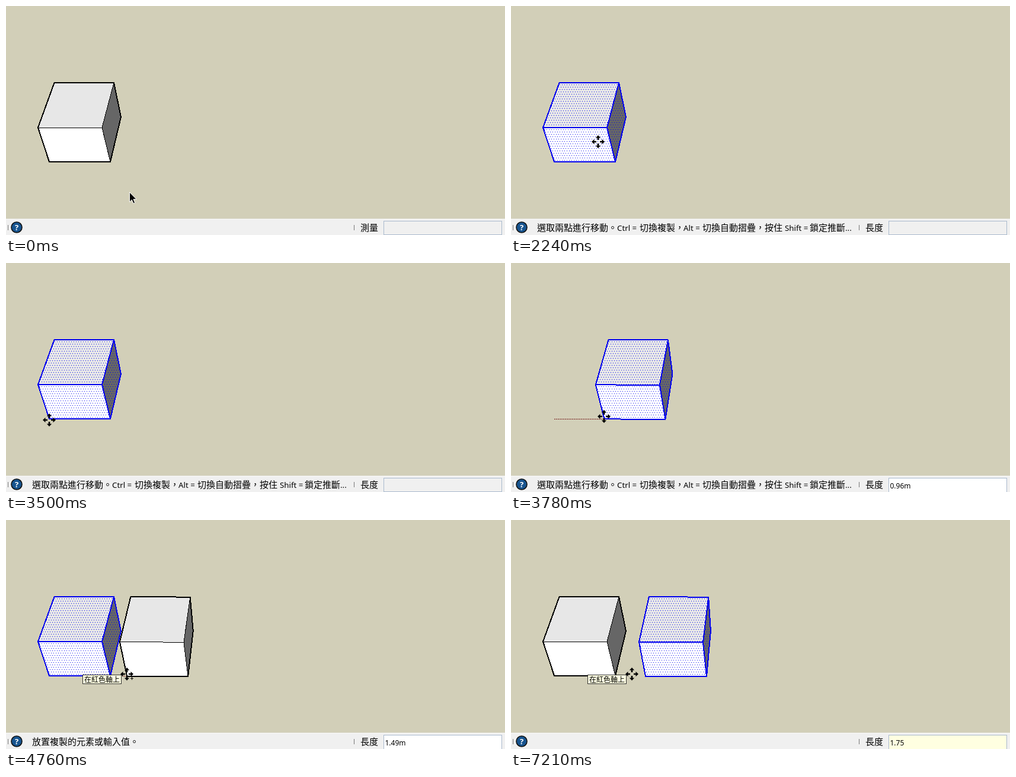
Animation of 842 by 388 pixels, one loop 8000 ms. Source, as an HTML page:

```html
<!DOCTYPE html>
<html lang="zh-TW">
<head>
<meta charset="utf-8">
<title>移動與複製</title>
<style>
  html, body { margin: 0; width: 100%; height: 100%; overflow: hidden; background: #d2cfb8; }
  svg { display: block; }
  text { font: 15px "Noto Sans CJK TC", "Noto Sans CJK", sans-serif; white-space: pre; }
  .latin { font: 13.3px "Noto Sans", "Open Sans", sans-serif; }
  .value { font: 12px "Noto Sans", "Open Sans", sans-serif; }
  .crisp { shape-rendering: crispEdges; }
</style>
</head>
<body>
<svg width="842" height="388" viewBox="0 0 842 388">
  <defs>
    <pattern id="dots" y="1" width="4" height="8" patternUnits="userSpaceOnUse">
      <path class="crisp" fill="#0000ee" d="M0 0h1v1h-1zM2 4h1v1h-1z"/>
    </pattern>
    <path id="arm" d="M0 -11L4.2 -6.5H1.3V-3H-1.3V-6.5H-4.2Z"/>
  </defs>
  <rect width="842" height="388" fill="#d2cfb8"/>
  <path id="guide" class="crisp" stroke="#701414" stroke-dasharray="2 1"/>
  <g id="scene" class="crisp"></g>

  <g id="bar">
    <rect y="360" width="842" height="28" fill="#f0f0f0"/>
    <path class="crisp" d="M0 360.5H842" stroke="#e2e1d8"/>
    <path class="crisp" d="M0 361.5H842" stroke="#fafafa"/>
    <path class="crisp" d="M3.5 371V380M587.5 371V380" stroke="#777"/>
    <circle cx="18" cy="375" r="9" fill="#17548f" stroke="#111" stroke-width="1.6"/>
    <text x="18" y="380" text-anchor="middle" fill="#fff" style="font:bold 13px 'Open Sans',sans-serif">?</text>
    <text class="status" x="44" y="381">選取物件。切換到擴充選取。拖曳滑鼠以選取多項。</text>
    <text class="status" y="381"><tspan x="44">選取兩點進行移動。</tspan><tspan class="latin" x="179">Ctrl =</tspan><tspan x="217">切換複製，</tspan><tspan class="latin" x="291">Alt =</tspan><tspan x="323">切換自動摺疊，</tspan><tspan x="428">按住</tspan><tspan class="latin" x="462">Shift =</tspan><tspan x="504">鎖定推斷</tspan><tspan class="latin" x="564">...</tspan></text>
    <text class="status" x="44" y="381">放置複製的元素或輸入值。</text>
    <text id="label" x="598" y="381"></text>
    <rect id="field" class="crisp" x="637.5" y="364.5" width="199" stroke="#a9b9cd"/>
    <text id="value" class="value" x="639.5" y="382"></text>
  </g>

  <g id="tip">
    <rect class="crisp" x="129.5" y="262.5" width="65" height="15" fill="#ffffe1" stroke="#333"/>
    <text x="132" y="275" style="font-size:12px">在紅色軸上</text>
  </g>
  <circle id="snap" cx="73" cy="263" r="4" fill="#1fa32a" stroke="#145c1a"/>
  <path id="arrow" d="M.5 .5V17L4.3 13.4L7 19.6L9.7 18.4L7 12.4H12Z" fill="#000" stroke="#fff"/>
  <g id="mover">
    <use href="#arm"/>
    <use href="#arm" transform="rotate(90)"/>
    <use href="#arm" transform="rotate(180)"/>
    <use href="#arm" transform="rotate(270)"/>
    <path id="plus" class="crisp" d="M6 7.5H11M8.5 5V10" stroke="#000"/>
  </g>
  <path id="edge" d="M106.5 261.5L111.5 266.5M111.5 261.5L106.5 266.5" stroke="#d22" stroke-width="1.5"/>
</svg>
<script>
const LOOP = 8000, BLUE = "#0000ee";
const $ = id => document.getElementById(id);
const set = (el, attrs) => { for (const k in attrs) el.setAttribute(k, attrs[k]); };
const show = (el, on) => set(el, { visibility: on ? "visible" : "hidden" });

// Last row whose start time has passed
const at = (rows, t) => rows.reduce((cur, row) => row[0] <= t ? row : cur);
// Evenly spaced rows, 70 ms apart
const run = (start, items) => items.map((v, i) => [start + i * 70].concat(v));

// Corner: x, y, then x and y shift per metre along the red axis
const CORNERS = {
  a: [81.5, 130, 86.5, 0], b: [182, 130, 86.4, .45], c: [194, 188, 81.7, 0],
  d: [176, 264, 88, .75], e: [73, 264, 88, .45], f: [54, 206, 92.6, .4], g: [162, 206, 92.6, .8]
};
const FACES = [["abgf", "#e7e7e7"], ["gbcd", "#666"], ["fgde", "#fff"]];

const corner = (k, len) => {
  const [x, y, dx, dy] = CORNERS[k];
  return [x + dx * len, y + dy * len];
};
const points = (keys, len) => [...keys].map(k => corner(k, len).join()).join(" ");

function add(parent, tag, attrs) {
  const el = document.createElementNS("http://www.w3.org/2000/svg", tag);
  set(el, attrs);
  return parent.appendChild(el);
}

function makeCube() {
  const g = add($("scene"), "g", { fill: "none", "stroke-linejoin": "round" });
  const faces = FACES.map(([keys, fill]) => [keys, add(g, "polygon", { fill })]);
  const dots = FACES.map(([keys]) => [keys, add(g, "polygon", { fill: "url(#dots)" })]);
  const inner = ["fg", "gb", "gd"].map(keys => [keys, add(g, "polyline", {})]);
  const outer = ["abcdef", add(g, "polygon", { "stroke-width": 2 })];
  const front = ["fgde", add(g, "polygon", { stroke: BLUE, "stroke-width": 2 })];
  const parts = [...faces, ...dots, ...inner, outer, front];

  // picked: 0 none, 1 front face, 2 front face and its edges, 3 all
  return (on, len, picked) => {
    set(g, { display: on ? "inline" : "none" });
    if (!on) return;
    const all = picked === 3, stroke = all ? BLUE : "#000";
    parts.forEach(([keys, el]) => set(el, { points: points(keys, len) }));
    dots.forEach(([keys, el]) => set(el, { display: all || (picked && keys === "fgde") ? "inline" : "none" }));
    inner.forEach(([, el]) => set(el, { stroke, "stroke-width": all ? 2 : 1 }));
    set(outer[1], { stroke });
    set(front[1], { display: picked === 2 ? "inline" : "none" });
  };
}
const first = makeCube(), second = makeCube();

const ARROW = [[0, 208, 315], ...run(140, [[199, 297], [181, 265], [162, 234], [150, 217]])];
const MOVER = [
  ...run(2240, [[147, 230], [141, 235], [134, 241], [126, 247], [117, 253], [106, 258], [95, 266], [85, 271]]),
  ...run(2940, [[80, 269], [75, 266], [76, 268], [78, 269]]),
  [3290, 73, 266]
];
const LENGTH = [
  [0, 0],
  ...run(3640, [.36, .7, .96, 1.12, 1.23, 1.31, 1.37, 1.41, 1.44, 1.46, 1.47]),
  ...run(4480, [1.48, 1.49]),
  [7210, 1.75]
];
const PICKED = [[0, 0], [560, 1], [700, 2], [840, 3]];
const STATUS = [[0, -1], [140, 0], [2240, 1], [3920, 2], [7210, -1]];
const TYPED = [[5390, "1"], [5460, "1."], [5880, "1.7"], [6090, "1.75"]];
const FIELD = [[0, "#f0f0f0", 23], [3640, "#fff", 25], [5390, "#ffffe1", 25]];
const lines = document.querySelectorAll(".status");

function draw(t) {
  const len = at(LENGTH, t)[1];
  const moving = t >= 3640, copying = t >= 3920, done = t >= 7210;

  first(true, copying ? 0 : len, done ? 0 : at(PICKED, t)[1]);
  second(copying, len, done ? 3 : 0);

  const from = corner("e", 0), to = corner("e", len);
  set($("guide"), { d: `M${from}L${to}` });
  show($("guide"), moving && !done);

  const line = at(STATUS, t)[1];
  lines.forEach((el, i) => show(el, i === line));
  $("label").textContent = t < 2240 ? "測量" : "長度";
  const [, fill, height] = at(FIELD, t);
  set($("field"), { fill, height });
  $("value").textContent = !moving ? "" : t < 5390 ? len.toFixed(2) + "m" : at(TYPED, t)[1];

  show($("tip"), t >= 4760);
  show($("snap"), t >= 3290 && t < 3500);
  show($("edge"), t >= 2590 && t < 2660);

  const tool = t >= 2240;
  show($("arrow"), !tool);
  show($("mover"), tool);
  show($("plus"), copying && !done);
  const [, ax, ay] = at(ARROW, t);
  set($("arrow"), { transform: `translate(${ax} ${ay})` });
  let [, mx, my] = at(MOVER, t);
  if (moving) {
    // The pointer stays put when the typed length takes effect
    mx = Math.floor(corner("e", Math.min(len, 1.49))[0]);
    my = len >= 1.45 ? 261 : 260;
  }
  set($("mover"), { transform: `translate(${mx} ${my})` });
}

const start = performance.now();
function tick() {
  draw((performance.now() - start) % LOOP);
  requestAnimationFrame(tick);
}
tick();
</script>
</body>
</html>
```
